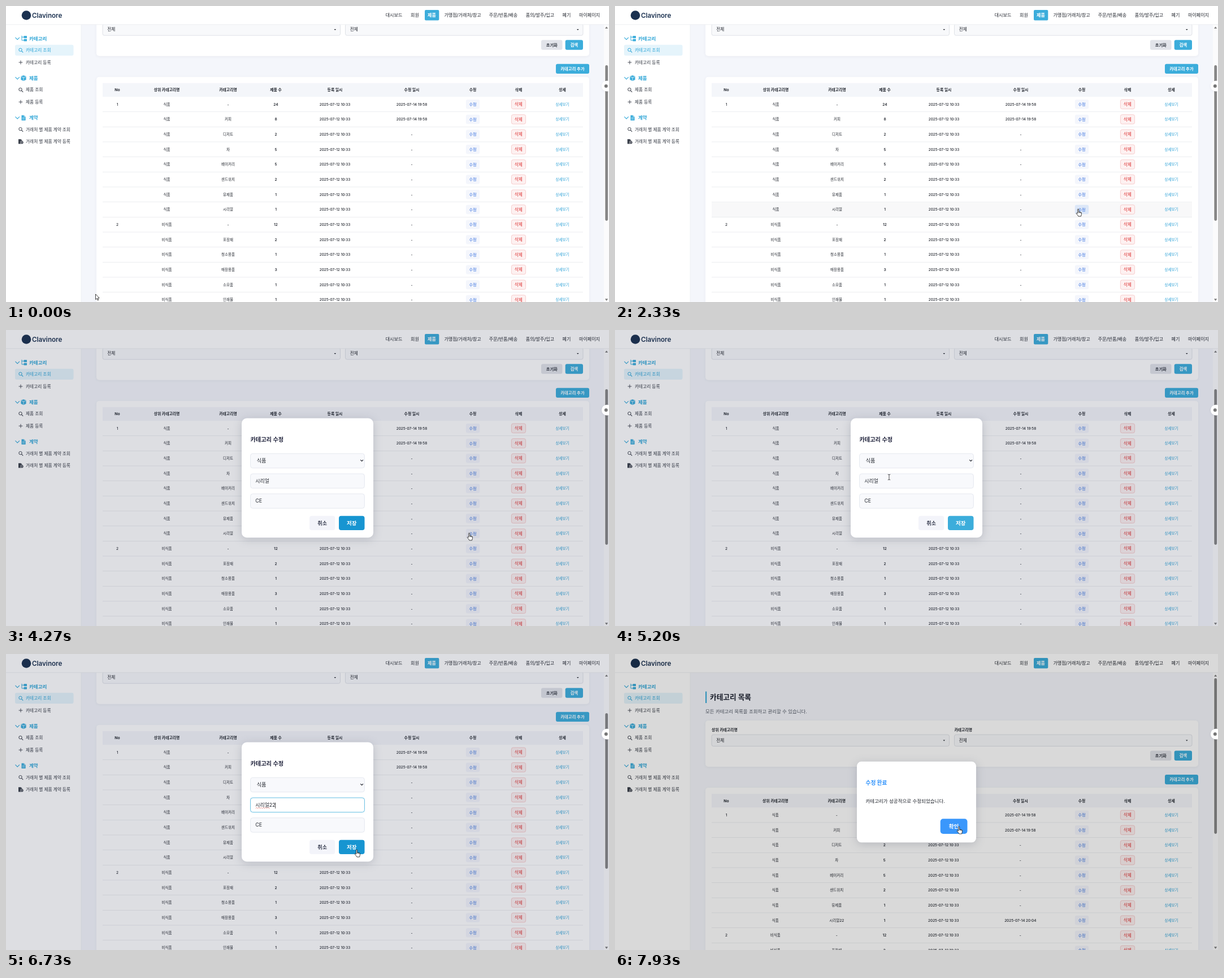
An HTML page that plays this animation: 1067 px wide and 525 px high, repeating every 8 s.

```html
<!DOCTYPE html>
<html lang="ko">
<head>
<meta charset="utf-8">
<style>
  html, body { margin: 0; width: 100%; height: 100%; overflow: hidden; background: #fff; }
  svg { display: block; width: 1067px; height: 525px; font-family: Inter, 'Noto Sans CJK KR', 'Noto Sans CJK', sans-serif; }
  .card { filter: drop-shadow(0 1px 2px #1e28460f); }
  .dialog { filter: drop-shadow(0 3px 8px #1e284630); }
</style>
</head>
<body>
<svg id="stage" viewBox="0 0 1067 525"></svg>
<script>
const stage = document.getElementById('stage');
const BLUE = '#3caddb', INK = '#22262e', NAVY = '#1d2745';
const FPS = 15, LOOP = 8000;
const SCROLL = 111.3, ROW = 26.67;

// Text is placed by the middle of its line.
const text = (x, y, s, size, fill = INK, weight = 500, anchor = 'middle') =>
  `<text x="${x}" y="${y + size * 0.37}" font-size="${size}" fill="${fill}" font-weight="${weight}" text-anchor="${anchor}">${s}</text>`;
const left = (x, y, s, size, fill, weight) => text(x, y, s, size, fill, weight, 'start');
const box = (x, y, w, h, fill, r = 0, more = '') =>
  `<rect x="${x}" y="${y}" width="${w}" height="${h}" rx="${r}" fill="${fill}" ${more}/>`;
const edge = (color, w = 0.6) => `stroke="${color}" stroke-width="${w}"`;
const path = (d, fill, more = '') => `<path d="${d}" fill="${fill}" ${more}/>`;
const line = (d, color, w) => path(d, 'none', edge(color, w) + ' stroke-linecap="round" stroke-linejoin="round"');
const disc = (x, y, r, fill, more = '') => `<circle cx="${x}" cy="${y}" r="${r}" fill="${fill}" ${more}/>`;
const at = (x, y, s) => `<g transform="translate(${x} ${y})">${s}</g>`;
const button = (x, y, w, h, fill, label, size, color, r = 3) =>
  box(x, y, w, h, fill, r) + text(x + w / 2, y + h / 2, label, size, color, 700);

const NAV = [[686.5, '대시보드'], [723.5, '회원'], [753.5, '제품'], [808, '가맹점/거래처/창고'],
  [880, '주문/반품/배송'], [945, '품의/발주/입고'], [992, '폐기'], [1032.5, '마이페이지']];
const HEADS = ['No', '상위 카테고리명', '카테고리명', '제품 수', '등록 일시', '수정 일시', '수정', '삭제', '상세'];
const COLS = [197, 284.5, 393, 477.5, 582, 718, 826, 907, 984.5];
const FOOD = [['-', 24], ['커피', 8], ['디저트', 2], ['차', 5], ['베이커리', 5], ['샌드위치', 2], ['유제품', 1], ['시리얼', 1]];
const OTHER = [['-', 12], ['포장재', 2], ['청소용품', 1], ['매장용품', 3], ['소모품', 1], ['인쇄물', 1]];
const ROWS = [...FOOD.map(r => ['식품', ...r]), ...OTHER.map(r => ['비식품', ...r])];
const EDITED = 7;

function header() {
  return box(0, 0, 1067, 33, '#fff') + box(0, 32.6, 1067, 0.7, '#e4e6ea') +
    disc(36, 16.5, 8.3, '#1b3150') + left(46, 16.5, 'Clavinore', 11.6, '#1b3150', 600) +
    box(741, 7, 25.3, 18.5, BLUE, 2) +
    NAV.map(([x, s]) => text(x, 16, s, 8.05, s === '제품' ? '#fff' : INK, s === '제품' ? 700 : 500)).join('');
}

const search = (y, c) => disc(25.5, y - 0.6, 2.7, 'none', edge(c, 1)) + line(`M27.6 ${y + 1.5}l2.3 2.3`, c, 1.1);
const plus = y => line(`M23 ${y}h6M26 ${y - 3}v6`, '#3a3f4a', 0.9);

function sidebar() {
  const group = (y, s, icon) => line(`M16.8 ${y - 1.4}l3.4 3.5 3.4-3.5`, BLUE, 1.2) + icon + left(41, y, s, 8.5, '#2ba4d6', 700);
  const tree = line('M28 53v8h4M28 55.2h4', BLUE, 1) + box(31.5, 53, 5.5, 4, BLUE, 0.6) + box(31.5, 58.4, 5.5, 4, BLUE, 0.6);
  const cube = path('M31 123l4.6 1.8v6L31 133l-4.6-2.2v-6z', BLUE) + line('M27 125.4l4 1.6 4-1.6M31 127v5.4', '#fff', 0.7);
  const file = path('M27.5 193.7h4.4l2.7 2.7v6.5h-7.1z', BLUE) + line('M29.2 198.3h3.6M29.2 200.6h3.6M32 193.9v2.4h2.5', '#fff', 0.6);
  const fileGear = path('M22 236.2h4.3l2.4 2.4v5.8H22z', '#3a3f4a') + disc(28.3, 242, 2.7, '#3a3f4a', edge('#fff', 0.6)) + disc(28.3, 242, 0.8, '#fff');
  const item = (y, s, c = '#333842') => left(35, y, s, 7.7, c, 500);
  return box(0, 33, 133, 492, '#fff') + box(132.7, 33, 0.6, 492, '#e8eaef') +
    box(16, 68.7, 103.5, 19.3, '#e5f4fb', 3) +
    group(57.5, '카테고리', tree) + search(78.3, '#2ba4d6') + item(78.3, '카테고리 조회', '#2ba4d6') +
    plus(100) + item(100.3, '카테고리 등록') +
    group(127.8, '제품', cube) + search(148.6, '#3a3f4a') + item(148.6, '제품 조회') +
    plus(170.2) + item(170.4, '제품 등록') +
    group(198, '계약', file) + search(218.8, '#3a3f4a') + item(218.8, '거래처 별 제품 계약 조회') +
    fileGear + item(240.3, '거래처 별 제품 계약 등록');
}

function tableRow(i, s) {
  const [parent, name, count] = ROWS[i], y = 285.6 + i * ROW;
  const x = COLS.map((c, k) => s.saved && k > 0 && k < 6 ? c - 0.7 : c);
  const edited = s.saved && i === EDITED;
  const modified = i < 2 ? '2025-07-14 19:58' : edited ? '2025-07-14 20:04' : '-';
  const no = i === 0 ? 1 : i === FOOD.length ? 2 : '';
  return (s.row === i ? box(171, y - ROW / 2, 850, ROW, '#f8f8f9') : '') +
    box(171, y + ROW / 2 - 0.3, 850, 0.6, '#dfe2e7') +
    text(x[0], y, no, 6.5) + text(x[1], y, parent, 6.5) +
    text(x[2], y, edited ? name + '22' : name, 6.5) + text(x[3], y, count, 6.5, INK, 600) +
    text(x[4], y, '2025-07-12 10:33', 6.4) + text(x[5], y, modified, 6.4) +
    box(x[6] - 12.2, y - 8.2, 24.4, 16.4, s.row === i && s.onEdit ? '#dce7f8' : '#f4f6fc', 3) + text(x[6], y, '수정', 7.2, '#2f6bde') +
    box(x[7] - 12.6, y - 8.3, 25.2, 16.6, '#fdf1f1', 3, edge('#f3b3b3')) + text(x[7], y, '삭제', 7.5, '#dc2f2f') +
    text(x[8], y, '상세보기', 6.5, '#2ba0d6');
}

function content(s) {
  const select = (x, label) => left(x, 134, label, 6.85, INK, 700) +
    box(x, 143, 420.5, 20.5, '#f8f9fb', 3, edge('#cdd1d8')) + left(x + 8.3, 153, '전체', 7.6) +
    path(`M${x + 409.5} 152.4h3.6l-1.8 2z`, INK);
  return box(160, 66.5, 2.2, 20.5, BLUE) + left(168, 76.6, '카테고리 목록', 12.7, '#1c2130', 700) +
    left(160, 102, '모든 카테고리 목록을 조회하고 관리할 수 있습니다.', 8.45, '#565c69', 400) +
    box(160, 118, 872, 82, '#fff', 5, 'class="card"') +
    select(171, '상위 카테고리명') + select(600.5, '카테고리명') +
    button(947, 171.5, 37.5, 17.5, '#e2e4ea', '초기화', 7.3, '#2c313b') +
    button(989.7, 171.5, 31.3, 17.5, BLUE, '검색', 7.5, '#fff') +
    button(973, 214, 59, 17.3, BLUE, '카테고리 추가', 7.35, '#fff') +
    box(160, 237, 872, 440, '#fff', 5, 'class="card"') + box(171, 248, 850, 24.3, '#f4f6fa') +
    HEADS.map((h, i) => text(COLS[i] - (s.saved && i > 0 && i < 6 ? 0.7 : 0), 260, h, 6.85, INK, 700)).join('') +
    ROWS.map((_, i) => tableRow(i, s)).join('');
}

const scrollbar = saved => box(1058, 33, 9, 492, '#fbfbfc') +
  path('M1060 40l2.6-3.6 2.6 3.6z', '#7c7c7c') + path('M1060 519.3l2.6 3.6 2.6-3.6z', '#7c7c7c') +
  box(1060.3, saved ? 43 : 105, 4.8, 276, '#868686', 2.4);

function editDialog(s) {
  const field = (y, focus) => box(432.6, y, 201.8, 25.6, focus ? '#fff' : '#f8f9fc', 4, edge(focus ? BLUE : '#e0e4ed', 0.8));
  let wave = 'M442 273.6';
  for (let i = 0; i < 12; i++) wave += `l1 ${i % 2 ? 1 : -1}l1 0`;
  return box(417, 156.6, 233, 211.6, '#fff', 9, 'class="dialog"') +
    left(432.5, 194, '카테고리 수정', 10.2, '#20233c', 700) +
    field(219.2) + left(443.7, 232, '식품', 9.1) + line('M627.6 230.7l2 2 2-2', INK, 1.2) +
    field(255, s.focus) + left(441.3, 268, '시리얼' + s.typed, 8.9, INK, 400) +
    (s.focus ? line(wave, '#e0483e', 0.6) : '') +
    (s.caret ? box(466 + s.typed.length * 5.2, 263.5, 0.7, 10.5, '#111') : '') +
    field(290.6) + left(441.3, 303, 'CE', 8.9, INK, 400) +
    button(537, 329.7, 45.3, 25.3, '#f3f4fa', '취소', 9, '#33384c', 4) +
    button(589, 329.7, 45.5, 25.3, s.onSave ? '#1795d1' : BLUE, '저장', 9.5, '#fff', 4);
}

const doneDialog = () => box(428, 190.8, 211, 143.5, '#fff', 8, 'class="dialog"') +
  left(443.5, 228, '수정 완료', 9.7, '#2f92fb', 700) +
  left(443.5, 261, '카테고리가 성공적으로 수정되었습니다.', 8.5, INK, 400) +
  button(575.7, 292.2, 47.8, 26.8, '#3a97fb', '확인', 9.6, '#fff', 5);

const POINTERS = {
  arrow: path('M0 0V9.6L2.2 7.6 3.7 11 5.3 10.3 3.8 7H6.7Z', '#fff', edge('#111', 0.8)),
  hand: path('M-.9 8V1a1 1 0 0 1 2 0V5.2l1.6.2 1.8.4 1.4.8V9.6L5 13H.4L-1 10.8-3.2 8.2a.9.9 0 0 1 1.2-1.1Z', '#fff', edge('#111', 0.8)) +
    line('M1.1 5.2v1.7M2.8 5.5v1.5M4.4 6v1.3', '#111', 0.6),
  beam: line('M-1.8-4.8Q0-4.8 0-4Q0-4.8 1.8-4.8M0-4V4M-1.8 4.8Q0 4.8 0 4Q0 4.8 1.8 4.8', '#222', 0.8)
};

// Pointer stops: time, x, y
const STOPS = [[133, 158.5, 511], [1000, 700, 377], [1870, 797, 358], [2330, 819.5, 360], [4600, 819.5, 360],
  [5070, 447, 268], [5200, 485, 261], [5333, 485, 261], [5470, 480, 266.3], [6200, 480, 266.3], [6600, 620.5, 347],
  [7870, 620.5, 347], [7930, 608.5, 306]];
function pointerAt(t) {
  const i = STOPS.findIndex(p => p[0] > t);
  if (i === 0) return STOPS[0].slice(1);
  if (i < 0) return STOPS[STOPS.length - 1].slice(1);
  const [a, b] = [STOPS[i - 1], STOPS[i]];
  let k = (t - a[0]) / (b[0] - a[0]);
  k = i === 2 || i === 3 ? 1 - (1 - k) ** 1.5 : k * k * (3 - 2 * k);
  return [a[1] + (b[1] - a[1]) * k, a[2] + (b[2] - a[2]) * k];
}

function stateAt(t) {
  const [x, y] = pointerAt(t);
  const saved = t >= 7520, editing = t >= 4260 && !saved;
  const focus = t >= 5660 && t < 7260;
  const onSave = editing && x > 589 && y > 330;
  const row = !editing && !saved && x > 171 && x < 1021 ? Math.floor((y - 161) / ROW) : -1;
  const onEdit = row >= 0 && x > 814 && x < 838;
  const inField = editing && x > 432 && x < 634 && y > 255 && y < 316;
  const caret = focus && (t < 6190 || t >= 6390 && t < 7125);
  const typed = t < 6390 ? '' : t < 6590 ? '2' : '22';
  const pointer = inField ? 'beam' : onEdit && t < 4190 || onSave && t < 7460 || t >= 7925 ? 'hand' : 'arrow';
  return { x, y, saved, editing, focus, onSave, row, onEdit, caret, typed, pointer };
}

function draw(t) {
  const s = stateAt(t);
  stage.innerHTML = box(0, 0, 1067, 525, '#f4f6fb') + at(0, s.saved ? 0 : -SCROLL, content(s)) +
    sidebar() + scrollbar(s.saved) + header() +
    (s.editing ? box(0, 0, 1067, 525, 'rgba(30,34,60,.15)') + editDialog(s) : '') +
    (s.saved ? box(0, 0, 1067, 525, 'rgba(0,0,0,.15)') + doneDialog() : '') +
    disc(1063.5, 142, 9.5, '#fff', 'class="card"') + disc(1061.8, 142, 3, '#777') +
    at(s.x, s.y, POINTERS[s.pointer]);
}

let shown = -1;
function tick(now) {
  const step = Math.floor((now % LOOP + 5) * FPS / 1000);
  if (step !== shown) draw((shown = step) * 1000 / FPS);
  requestAnimationFrame(tick);
}
tick(performance.now());
</script>
</body>
</html>
```
